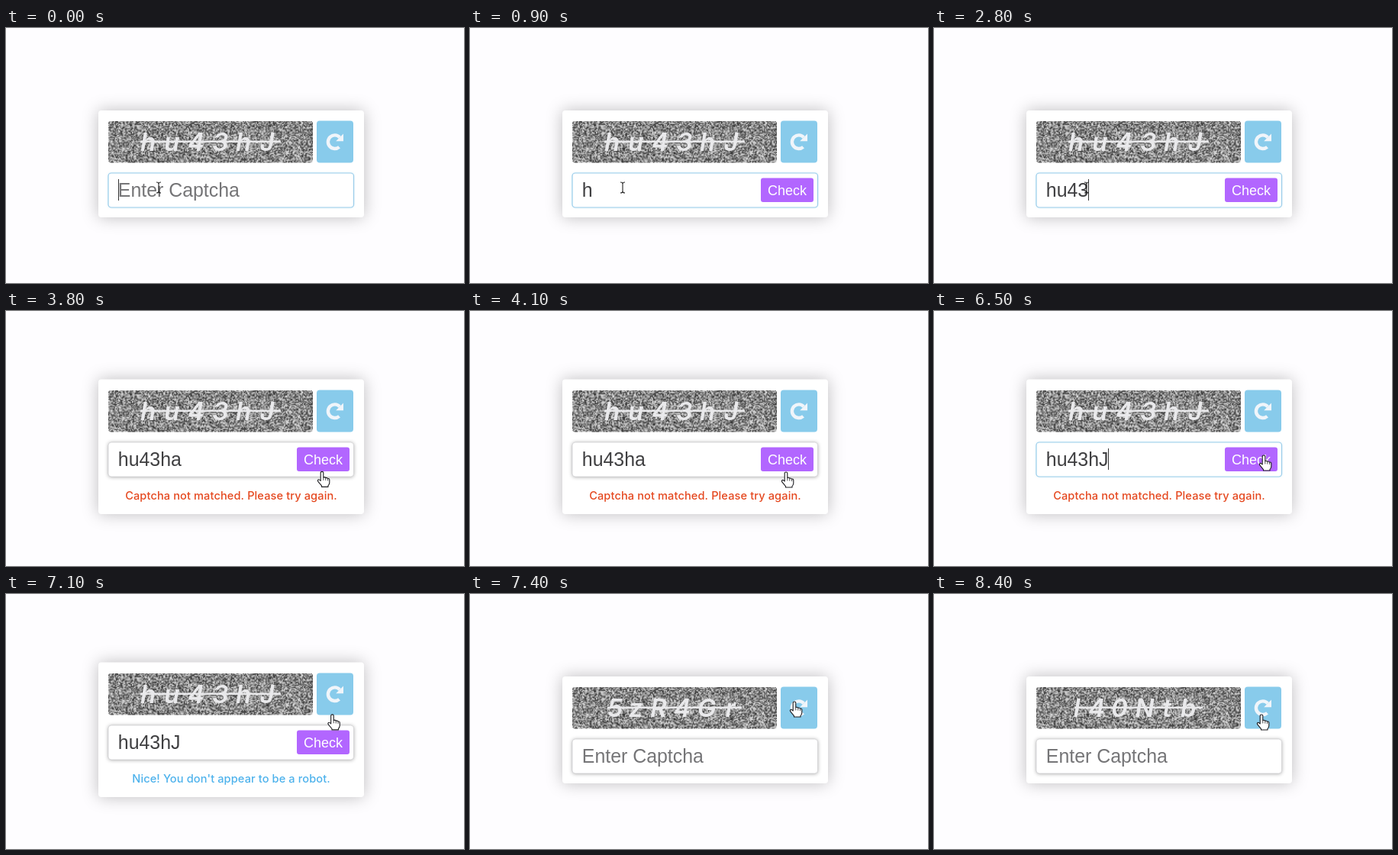
Recreate the animation shown at these times as an HTML page with a canvas. Size 600 by 334 pixels, loop 8.5 s.

```html
<!DOCTYPE html>
<html lang="en">
<head>
<meta charset="utf-8">
<title>Captcha form</title>
<style>
  html, body { margin: 0; width: 100%; height: 100%; overflow: hidden; background: #fefdff; }
  canvas { display: block; width: 600px; height: 334px; }
</style>
</head>
<body>
<canvas id="stage"></canvas>
<script>
const W = 600, H = 334, LOOP = 8500, STEP = 100;
const canvas = document.getElementById('stage');
const ctx = canvas.getContext('2d');
const dpr = window.devicePixelRatio || 1;
canvas.width = W * dpr;
canvas.height = H * dpr;

const ARIAL = '"Liberation Sans", Arial, sans-serif';
const ROUND = 'Inter, "Open Sans", sans-serif';
const SIZE = 24.9, TEXT_X = 146.8;

// Times of each state change: [start, value]
const typed = [
  [0, ''], [500, 'h'], [1100, 'hu'], [1800, 'hu4'], [2200, 'hu43'],
  [2900, 'hu43h'], [3000, 'hu43ha'], [4900, 'hu43h'], [5700, 'hu43hJ'], [7400, '']
];
const focused = [[0, true], [3400, false], [4300, true], [6600, false]];
const caretOn = [
  [0, true], [300, false], [500, true], [900, false], [1100, true],
  [1600, false], [1800, true], [2600, false], [2800, true],
  [5400, false], [5700, true], [6200, false], [6400, true]
];
const message = [
  [0, null],
  [3400, ['Captcha not matched. Please try again.', '#e5481f']],
  [6700, ["Nice! You don't appear to be a robot.", '#4db2ec']],
  [7400, null]
];
const codes = [
  [0, { text: 'hu43hJ', xs: [186, 217, 249, 281, 311, 342], from: 176, to: 360 }],
  [7400, { text: '5zR4Gr', xs: [190, 217, 247, 278, 310, 341], from: 180, to: 356 }],
  [8300, { text: 'I40Ntb', xs: [187, 213, 243, 276, 305, 333], from: 184, to: 352 }]
];
// Pointer hot spot: [time, x, y]
const pointer = [
  [0, 200, 209], [2800, 200, 209], [3300, 414, 209], [4100, 414, 211],
  [4400, 250, 196], [6100, 250, 196], [6400, 432, 189], [6800, 432, 189],
  [7300, 425, 141], [7500, 425, 141], [8000, 429, 158], [8500, 429, 158]
];

function at(track, t) {
  let value = track[0][1];
  for (const [start, v] of track) if (t >= start) value = v;
  return value;
}

function pointerAt(t) {
  const i = Math.max(1, pointer.findIndex(p => p[0] > t));
  const [t0, x0, y0] = pointer[i - 1], [t1, x1, y1] = pointer[i];
  const u = (t - t0) / (t1 - t0), e = u * u * (3 - 2 * u);
  return [x0 + (x1 - x0) * e, y0 + (y1 - y0) * e];
}

function random(seed) {
  return () => {
    seed = (seed * 1664525 + 1013904223) >>> 0;
    return seed / 4294967296;
  };
}

function makeNoise(w, h) {
  const c = document.createElement('canvas');
  c.width = w;
  c.height = h;
  const g = c.getContext('2d'), img = g.createImageData(w, h), rnd = random(7);
  for (let i = 0; i < img.data.length; i += 4) {
    const v = 45 + 185 * rnd();
    img.data[i] = img.data[i + 1] = img.data[i + 2] = v;
    img.data[i + 3] = 255;
  }
  g.putImageData(img, 0, 0);
  return c;
}
const noise = makeNoise(190, 39);

function box(x, y, w, h, r) {
  ctx.beginPath();
  ctx.roundRect(x, y, w, h, r);
}

function shadow(color, blur, dy = 0) {
  ctx.shadowColor = color;
  ctx.shadowBlur = blur * dpr;
  ctx.shadowOffsetY = dy * dpr;
}

function text(str, x, y, font, color, align = 'left', spacing = 0) {
  ctx.font = font;
  ctx.fillStyle = color;
  ctx.textAlign = align;
  ctx.letterSpacing = spacing + 'px';
  ctx.fillText(str, x, y);
}

function drawCard(open) {
  ctx.save();
  shadow('rgba(0,0,0,.26)', 21);
  ctx.fillStyle = '#fff';
  if (open) box(121, 89.5, 348, 176.5, 4);
  else box(121, 108, 348, 140, 4);
  ctx.fill();
  ctx.restore();
}

function drawCode(code) {
  ctx.save();
  box(134, 121.5, 268, 55, 4);
  ctx.clip();
  ctx.drawImage(noise, 134, 121.5, 268, 55);
  [...code.text].forEach((ch, i) =>
    text(ch, code.xs[i], 161, `italic 600 33px ${ROUND}`, '#e9e9eb', 'center'));
  ctx.fillStyle = '#e9e9eb';
  ctx.fillRect(code.from, 147.5, code.to - code.from, 2.6);
  ctx.restore();
}

function drawRefresh() {
  ctx.fillStyle = '#88cbeb';
  box(407, 121.5, 48, 55, 4);
  ctx.fill();
  ctx.strokeStyle = ctx.fillStyle = '#f0f5fa';
  ctx.lineWidth = 4.4;
  ctx.beginPath();
  ctx.arc(430.7, 149.2, 8.8, Math.PI * 0.27, Math.PI * 1.76);
  ctx.stroke();
  ctx.beginPath();
  ctx.moveTo(442, 138.5);
  ctx.lineTo(442, 148.3);
  ctx.lineTo(432.2, 148.3);
  ctx.closePath();
  ctx.fill();
}

function drawInput(t) {
  const value = at(typed, t), focus = at(focused, t);
  ctx.save();
  if (focus) shadow('rgba(135,206,235,.5)', 3);
  else shadow('rgba(0,0,0,.36)', 5, 0.5);
  ctx.fillStyle = '#fff';
  box(134, 190, 321.5, 45, 4);
  ctx.fill();
  ctx.restore();
  ctx.strokeStyle = focus ? '#9acdea' : '#cfcfd1';
  ctx.lineWidth = focus ? 1.2 : 0.7;
  ctx.stroke();

  const font = `${SIZE}px ${ARIAL}`;
  text(value || 'Enter Captcha', TEXT_X, 221, font, value ? '#3f3f41' : '#757577');
  if (focus && at(caretOn, t)) {
    const x = TEXT_X + (value ? ctx.measureText(value).width : 0.6);
    ctx.fillStyle = '#333';
    ctx.fillRect(Math.round(x), 198, 1, 28);
  }
  if (value) {
    ctx.fillStyle = '#b266ff';
    box(381, 196.5, 69, 31.5, 3);
    ctx.fill();
    text('Check', 415.5, 219, `18px ${ARIAL}`, '#fff', 'center');
  }
}

function drawBeam(x, y) {
  ctx.strokeStyle = '#222';
  ctx.lineWidth = 1.1;
  ctx.beginPath();
  for (const s of [-1, 1]) {
    ctx.moveTo(x - 3, y + 7 * s);
    ctx.quadraticCurveTo(x, y + 7 * s, x, y + 5 * s);
    ctx.quadraticCurveTo(x, y + 7 * s, x + 3, y + 7 * s);
  }
  ctx.moveTo(x, y - 6);
  ctx.lineTo(x, y + 6);
  ctx.stroke();
}

const hand = new Path2D('M-1.8 12V1.6Q-1.8 0 0 0Q1.8 0 1.8 1.6V7.6Q3.6 6.6 4.8 8.2' +
  'Q6.6 7.4 7.6 9.2Q9.6 8.6 9.8 10.6V14.5Q9.6 17 8 18.4V20H-.5V18.6' +
  'L-5 13.2Q-6.2 11.4-4.9 10.5Q-3.8 10-1.8 12Z');
const knuckles = new Path2D('M1.8 7.6V11.4M4.8 8.2V11.6M7.6 9.2V12');

function drawHand(x, y) {
  ctx.save();
  ctx.translate(x, y);
  ctx.lineJoin = 'round';
  ctx.lineWidth = 1.1;
  ctx.fillStyle = '#fff';
  ctx.strokeStyle = '#1c1c20';
  ctx.fill(hand);
  ctx.stroke(hand);
  ctx.lineWidth = 0.8;
  ctx.stroke(knuckles);
  ctx.restore();
}

function draw(time) {
  const t = Math.floor((time % LOOP) / STEP) * STEP;
  const note = at(message, t), lift = note ? -18 : 0;
  ctx.setTransform(dpr, 0, 0, dpr, 0, 0);
  ctx.fillStyle = '#fefdff';
  ctx.fillRect(0, 0, W, H);
  drawCard(note);

  ctx.save();
  ctx.translate(0, lift);
  drawCode(at(codes, t));
  drawRefresh();
  drawInput(t);
  ctx.restore();
  if (note) text(note[0], 295, 246.5, `500 14.6px ${ROUND}`, note[1], 'center', 0.1);

  const [x, y] = pointerAt(t);
  const overInput = x > 134 && x < 381 && y > 190 + lift && y < 235 + lift;
  (overInput ? drawBeam : drawHand)(x, y);
}

const start = performance.now();
function tick() {
  draw(performance.now() - start);
  requestAnimationFrame(tick);
}
tick();
</script>
</body>
</html>
```
